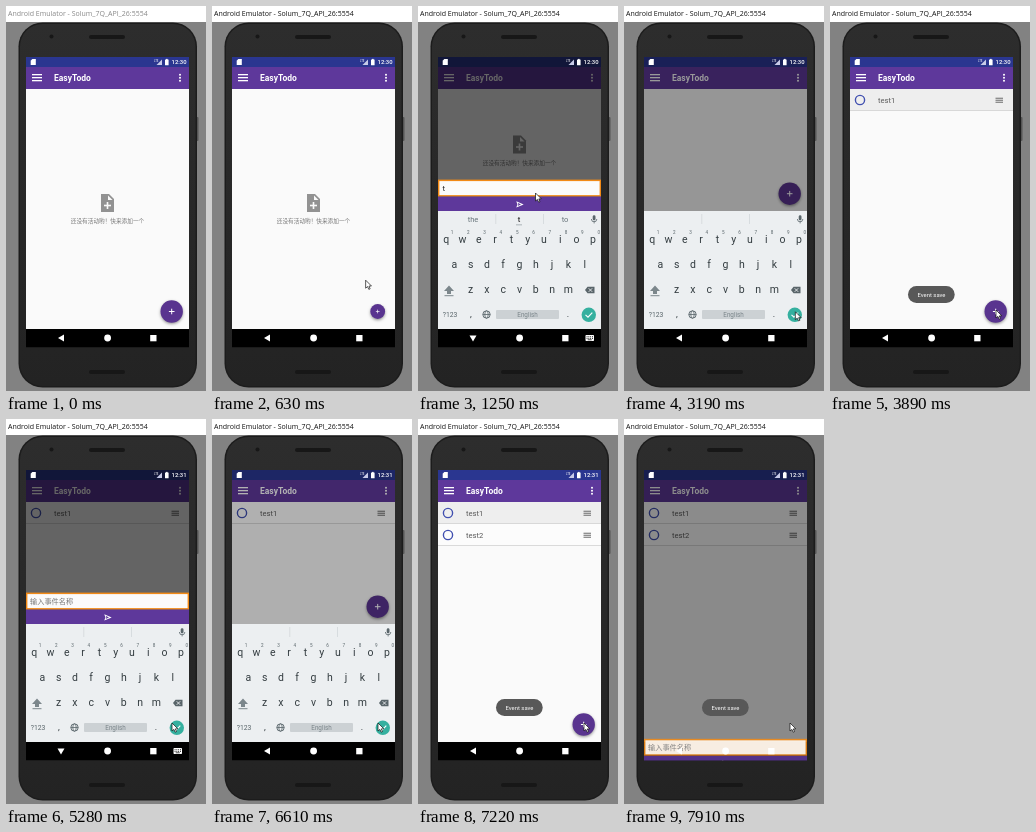
Write an HTML page with a canvas that moves like this. It is 200 by 385 pixels and loops after 7990 ms.

```html
<!DOCTYPE html>
<html lang="zh">
<head>
<meta charset="utf-8">
<title>EasyTodo</title>
<style>
  html, body { margin: 0; width: 100%; height: 100%; overflow: hidden; background: #828282; }
  canvas { display: block; width: 200px; height: 385px; }
</style>
</head>
<body>
<canvas id="stage"></canvas>
<script>
const LOOP = 7990;
const canvas = document.getElementById('stage');
const ctx = canvas.getContext('2d');
const ratio = window.devicePixelRatio || 1;
canvas.width = 200 * ratio;
canvas.height = 385 * ratio;

const SANS = 'Roboto, "Noto Sans CJK SC", "Noto Sans CJK", sans-serif';
const CJK = '"Noto Sans CJK SC", "Noto Sans CJK", sans-serif';
const KEYBOARD_HEIGHT = 118;

// Dialog openings and closings, in ms
const OPENS = [400, 3970, 7450];
const CLOSES = [3110, 6460];
const TYPING = [
  [0, ''], [1170, 't'], [1400, 'te'], [1560, 'tes'], [1710, 'test'], [1940, 'test1'],
  [3110, ''], [5360, 't'], [5660, 'te'], [5830, 'tes'], [5980, 'test'], [6140, 'test2'], [6460, '']
];
const SUGGESTIONS = {
  t: ['the', 't', 'to'], te: ['the', 'te', 'test'], tes: ['yes', 'tes', 'test'],
  test: ['tests', 'test', 'text']
};
const POINTER_X = [[70, 168], [230, 166], [400, 166], [1100, 117.5], [1940, 117.5], [2480, 184],
  [2720, 173], [2960, 172], [3110, 172], [3500, 166]];
const POINTER_Y = [[70, 390], [230, 304], [400, 304], [1100, 187], [1940, 187], [2480, 290],
  [2720, 304], [2960, 306], [3110, 306], [3500, 304]];

const clamp = v => Math.max(0, Math.min(1, v));
const ramp = (t, from, to) => clamp((t - from) / (to - from));

function track(keys, t) {
  const i = keys.findIndex(k => k[0] > t);
  if (i === 0) return keys[0][1];
  if (i < 0) return keys[keys.length - 1][1];
  const [t0, a] = keys[i - 1], [t1, b] = keys[i];
  const u = (t - t0) / (t1 - t0);
  return a + (b - a) * u * u * (3 - 2 * u);
}

const latest = (list, t) => list.filter(s => s <= t).pop() ?? -Infinity;
const typedAt = t => TYPING.filter(k => k[0] <= t).pop()?.[1] ?? '';

function rect(x, y, w, h, color) {
  ctx.fillStyle = color;
  ctx.fillRect(x, y, w, h);
}
function rounded(x, y, w, h, r, color) {
  ctx.fillStyle = color;
  ctx.beginPath();
  ctx.roundRect(x, y, w, h, r);
  ctx.fill();
}
function disc(x, y, r, color) {
  ctx.fillStyle = color;
  ctx.beginPath();
  ctx.arc(x, y, r, 0, 7);
  ctx.fill();
}
function ring(x, y, r, color, width) {
  ctx.strokeStyle = color;
  ctx.lineWidth = width;
  ctx.beginPath();
  ctx.arc(x, y, r, 0, 7);
  ctx.stroke();
}
function polygon(points, color) {
  ctx.fillStyle = color;
  ctx.beginPath();
  points.forEach(([x, y]) => ctx.lineTo(x, y));
  ctx.closePath();
  ctx.fill();
}
function line(points, color, width) {
  ctx.strokeStyle = color;
  ctx.lineWidth = width;
  ctx.beginPath();
  points.forEach(([x, y]) => ctx.lineTo(x, y));
  ctx.stroke();
}
function label(text, x, y, size, color, align = 'left', weight = 400, family = SANS) {
  ctx.font = `${weight} ${size}px ${family}`;
  ctx.textAlign = align;
  ctx.textBaseline = 'middle';
  ctx.fillStyle = color;
  ctx.fillText(text, x, y);
}
function faded(alpha, draw) {
  if (alpha <= 0) return;
  ctx.save();
  ctx.globalAlpha = alpha;
  draw();
  ctx.restore();
}

function drawDesktop(t) {
  rect(0, 0, 200, 385, '#828282');
  rect(0, 0, 200, 16, '#fff');
  label('Android Emulator - Solum_7Q_API_26:5554', 2, 8.5, 7, t < 70 ? '#888' : '#111',
    'left', 400, '"Open Sans", sans-serif');
  rounded(190, 111, 2.5, 24, 1, '#555');
  rounded(12.5, 16.5, 178.5, 365, 24, '#1c1c1c');
  const body = ctx.createLinearGradient(0, 18, 0, 380);
  body.addColorStop(0, '#2d2d2d');
  body.addColorStop(1, '#232323');
  rounded(14, 18, 175.5, 362, 22.5, body);
  rounded(83, 29, 36, 4, 2, '#171717');
  rounded(83, 364, 36, 4, 2, '#171717');
  disc(45.5, 30.5, 2, '#171717');
}

function drawToolbar() {
  rect(20, 51, 163, 10, '#2a3690');
  rect(20, 61, 163, 22, '#5e389b');
  for (let i = 0; i < 3; i++) {
    rect(26, 68 + i * 3, 10, 1.3, '#fff');
    disc(174, 68.7 + i * 3, 1, '#fff');
  }
  label('EasyTodo', 48, 72.3, 8.5, '#fff', 'left', 700);
}

function drawEmptyHint(y) {
  polygon([[95, y - 9], [103, y - 9], [108, y - 4], [108, y + 9], [95, y + 9]], '#929292');
  polygon([[102, y - 7.5], [106.5, y - 3], [102, y - 3]], '#fafafa');
  rect(100.7, y - 1, 1.6, 7, '#fafafa');
  rect(98, y + 1.7, 7, 1.6, '#fafafa');
  label('还没有活动哟！快来添加一个', 101.5, y + 18, 5.65, '#777', 'center', 400, CJK);
}

function drawRow(text, y, alpha, color) {
  faded(alpha, () => {
    rect(20, y, 163, 21.5, color);
    rect(20, y + 21.2, 163, 0.8, '#d2d2d2');
    ring(30, y + 11, 4.6, '#4150b0', 1.4);
    label(text, 48, y + 11.3, 7.6, '#5c5c5c');
    for (let i = 0; i < 3; i++) rect(165.5, y + 8.7 + i * 2, 7.5, 1.1, '#777');
  });
}

function drawFab(y, scale) {
  if (scale <= 0) return;
  ctx.save();
  ctx.translate(165.7, y);
  ctx.scale(scale, scale);
  ctx.shadowColor = 'rgba(0,0,0,.4)';
  ctx.shadowBlur = 3 * ratio;
  ctx.shadowOffsetY = 1.3 * ratio;
  disc(0, 0, 11.2, '#59348f');
  ctx.shadowColor = 'transparent';
  rect(-2.8, -0.5, 5.6, 1, '#fff');
  rect(-0.5, -2.8, 1, 5.6, '#fff');
  ctx.restore();
}

function drawStatus(t) {
  polygon([[26.3, 53], [29.8, 53], [29.8, 59], [24.7, 59], [24.7, 54.8]], '#fff');
  label('LTE', 148, 54.8, 2.8, '#fff');
  polygon([[150.5, 59], [156, 53.5], [156, 59]], '#c8cbe8');
  rounded(159, 53.5, 3.6, 5.7, 0.5, '#fff');
  rect(160, 52.9, 1.6, 1, '#fff');
  label(t < 4820 ? '12:30' : '12:31', 180.5, 56.5, 5.9, '#fff', 'right', 500);
}

function drawPanel(y, text) {
  rect(20, y, 163, 17, '#f28a16');
  rect(21.4, y + 1.5, 160.2, 14, '#fbfbfb');
  if (text) label(text, 24.5, y + 8.8, 8, '#222');
  else label('输入事件名称', 24, y + 8.2, 7.2, '#777', 'left', 400, CJK);
  rect(20, y + 17, 163, 14.5, '#5e389b');
  const s = y + 24.8;
  polygon([[98.3, s - 3.2], [105.7, s], [98.3, s + 3.2], [99.4, s]], '#fff');
  polygon([[99.6, s - 1.6], [103, s], [99.6, s + 1.6], [100.4, s]], '#5e389b');
}

function drawKeyboard(y, text) {
  const ink = '#343d41', soft = '#59656a', pitch = 16.3;
  ctx.save();
  ctx.translate(0, y);
  rect(20, 0, 163, KEYBOARD_HEIGHT, '#eceff1');
  rect(77.5, 3, 0.7, 10, '#cfd4d7');
  rect(125, 3, 0.7, 10, '#cfd4d7');
  if (text) {
    const words = SUGGESTIONS[text] || ['', text, ''];
    words.forEach((word, i) =>
      label(word, 55 + i * 46, 8.8, 7.6, i === 1 ? '#333' : '#68757b', 'center', i === 1 ? 500 : 400));
    for (let i = -1; i < 2; i++) disc(101 + i * 2, 13.8, 0.6, '#68757b');
  }
  rounded(174.7, 4.3, 2.8, 5, 1.4, soft);
  line([[173.3, 8], [174.3, 10.4], [177.9, 10.4], [178.9, 8]], soft, 0.8);
  rect(175.7, 10.4, 0.8, 2, soft);

  [...'qwertyuiop'].forEach((key, i) => {
    label(key, 28.2 + i * pitch, 29, 10.5, ink, 'center');
    label(String((i + 1) % 10), 34 + i * pitch, 21.3, 4.6, soft, 'center');
  });
  [...'asdfghjkl'].forEach((key, i) => label(key, 36.3 + i * pitch, 53.5, 10.5, ink, 'center'));
  [...'zxcvbnm'].forEach((key, i) => label(key, 52.6 + i * pitch, 79, 10.5, ink, 'center'));

  polygon([[31, 74.5], [36, 80], [33, 80], [33, 83], [29, 83], [29, 80], [26, 80]], '#7c878c');
  rect(26.5, 84.2, 9, 1, '#7c878c');
  polygon([[167, 79], [169.5, 75.8], [176.5, 75.8], [176.5, 82.2], [169.5, 82.2]], soft);
  line([[170.7, 77.3], [174.2, 80.8]], '#eceff1', 0.9);
  line([[174.2, 77.3], [170.7, 80.8]], '#eceff1', 0.9);

  label('?123', 32, 103.5, 6.8, soft, 'center');
  label(',', 53, 103, 9, ink, 'center');
  label('.', 150, 103, 9, ink, 'center');
  ring(68.5, 103.5, 3.7, soft, 0.9);
  line([[64.8, 103.5], [72.2, 103.5]], soft, 0.8);
  ctx.beginPath();
  ctx.ellipse(68.5, 103.5, 1.7, 3.7, 0, 0, 7);
  ctx.stroke();
  rounded(78, 99, 63, 9, 1, '#ccd1d4');
  label('English', 109.5, 103.7, 6.3, '#7a858a', 'center');
  disc(170.8, 103.8, 7.2, '#35b09f');
  line([[167.5, 103.8], [170, 106.2], [174.3, 101.6]], '#fff', 1.1);
  ctx.restore();
}

function drawNavigation(keyboardShown) {
  polygon(keyboardShown
    ? [[51.5, 329.5], [58.5, 329.5], [55, 335.5]]
    : [[58, 328.5], [58, 335.5], [52, 332]], '#fff');
  disc(101.6, 332, 3.4, '#fff');
  rect(144.2, 329, 6.3, 6.3, '#fff');
  if (!keyboardShown) return;
  rounded(167.5, 329, 8.5, 6, 0.7, '#fff');
  for (let i = 0; i < 4; i++) {
    rect(168.6 + i * 1.8, 330.3, 0.9, 0.9, '#000');
    rect(168.6 + i * 1.8, 331.9, 0.9, 0.9, '#000');
  }
  rect(169.7, 333.5, 4, 0.7, '#000');
}

function drawToast(alpha) {
  faded(alpha, () => {
    rounded(78, 280, 46.7, 17, 8.5, '#585858');
    label('Event save', 101.5, 288.9, 5.9, '#fff', 'center');
  });
}

function drawPointer(x, y) {
  const arrow = [[0, 0], [0, 8], [1.9, 6.4], [3.2, 9.2], [4.5, 8.6], [3.3, 5.9], [5.8, 5.8]]
    .map(([dx, dy]) => [x + dx, y + dy]);
  polygon(arrow, '#fff');
  line([...arrow, arrow[0]], '#111', 0.7);
}

// Poses the dialog, keyboard and button from the latest opening or closing
function dialogPose(t) {
  const opened = latest(OPENS, t), closed = latest(CLOSES, t);
  if (opened > closed) {
    const age = t - opened;
    const keyboard = 1 - (1 - ramp(age, 560, 700)) ** 2;
    return {
      keyboard,
      scrim: track([[230, 0], [380, 0.36], [460, 0.45], [620, 0.6]], age),
      panelTop: 345 - 53 * ramp(age, 385, 545) - (KEYBOARD_HEIGHT + 0.4) * keyboard,
      panelAlpha: ramp(age, 385, 470),
      fab: 1 - ramp(age, 180, 330),
      resized: keyboard > 0.9,
      arrowDown: keyboard > 0.4,
      focused: age < 150
    };
  }
  const age = t - closed;
  return {
    keyboard: 1 - ramp(age, 150, 300) ** 2,
    scrim: track([[0, 0.6], [80, 0.4], [300, 0]], age),
    panelTop: 173.6 + 20 * ramp(age, 0, 80),
    panelAlpha: 1 - ramp(age, 0, 80),
    fab: 1,
    resized: age < 160,
    arrowDown: age < 75,
    focused: age > 700
  };
}

function draw(t) {
  ctx.setTransform(ratio, 0, 0, ratio, 0, 0);
  const pose = dialogPose(t);
  const sinceClose = t - latest(CLOSES, t);
  drawDesktop(t);

  ctx.save();
  ctx.beginPath();
  ctx.rect(20, 51, 163, 290.5);
  ctx.clip();
  rect(20, 51, 163, 272, '#fafafa');
  drawToolbar();
  if (t < CLOSES[0]) drawEmptyHint(pose.resized ? 138.5 : 197);
  CLOSES.forEach((start, i) => {
    const color = i === 0 && pose.focused ? '#eeeeee' : '#fcfcfc';
    drawRow('test' + (i + 1), 83 + i * 22, ramp(t, start + 330, start + 480), color);
  });
  drawFab(pose.resized ? 187.7 : 305.5, pose.fab);
  faded(pose.scrim, () => rect(20, 51, 163, 272, '#000'));
  drawStatus(t);
  rect(20, 323, 163, 18.5, '#000');
  if (Number.isFinite(sinceClose)) {
    drawToast(ramp(sinceClose, 300, 450) * (1 - ramp(sinceClose, 1700, 1900)));
  }
  faded(pose.panelAlpha, () => drawPanel(pose.panelTop, typedAt(t)));
  if (pose.keyboard > 0) {
    ctx.save();
    ctx.beginPath();
    ctx.rect(20, 51, 163, 272);
    ctx.clip();
    drawKeyboard(323 - KEYBOARD_HEIGHT * pose.keyboard, typedAt(t - 80) && typedAt(t));
    ctx.restore();
  }
  drawNavigation(pose.arrowDown);
  ctx.restore();

  if (t >= 70) drawPointer(track(POINTER_X, t), track(POINTER_Y, t));
}

const began = performance.now();
function tick() {
  draw((performance.now() - began) % LOOP);
  requestAnimationFrame(tick);
}
tick();
</script>
</body>
</html>
```
